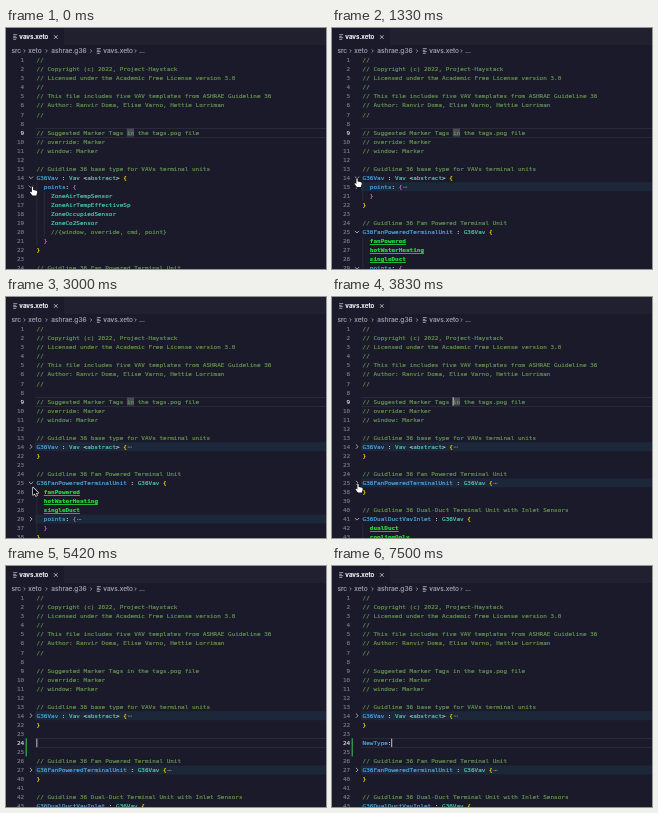
An HTML page with a canvas that plays this animation: 320 by 241 pixels, repeating every 8 s.

```html
<!DOCTYPE html>
<html lang="en">
<head>
<meta charset="utf-8">
<title>Code folding</title>
<style>
html, body { margin: 0; width: 100%; height: 100%; overflow: hidden; background: #1b1a2a; }
canvas { display: block; width: 320px; height: 241px; }
</style>
</head>
<body>
<canvas id="stage" width="320" height="241"></canvas>
<script>
const ctx = document.getElementById('stage').getContext('2d');
const LOOP = 8000, LEFT = 30.6, CHAR = 3.61, TOP = 32, PITCH = 9.05;
const MONO = '"DejaVu Sans Mono", monospace', SANS = 'Inter, sans-serif';
const C = {
  bg: '#1b1a2a', bar: '#20202f', line: '#2f2e3e', fold: '#1c2739', guide: '#353449',
  num: '#737682', numOn: '#d0d0d4', plain: '#d4d4d4', comment: '#639350', key: '#4fa6e0',
  type: '#4ec9b0', marker: '#23e03c', braces: ['#ffd700', '#c86ecb'], grey: '#a3a2b0',
  added: '#37a04c'
};

const code = `//
// Copyright (c) 2022, Project-Haystack
// Licensed under the Academic Free License version 3.0
//
// This file includes five VAV templates from ASHRAE Guideline 36
// Author: Ranvir Doma, Elise Varno, Hettie Lorriman
//

// Suggested Marker Tags in the tags.pog file
// override: Marker
// window: Marker

// Guidline 36 base type for VAVs terminal units
G36Vav : Vav <abstract> {
  points: {
    ZoneAirTempSensor
    ZoneAirTempEffectiveSp
    ZoneOccupiedSensor
    ZoneCo2Sensor
    //{window, override, cmd, point}
  }
}

// Guidline 36 Fan Powered Terminal Unit
G36FanPoweredTerminalUnit : G36Vav {
  fanPowered
  hotWaterHeating
  singleDuct
  points: {
    DischargeFanSpeedCmd
    DischargeFanRunSensor





  }
}

// Guidline 36 Dual-Duct Terminal Unit with Inlet Sensors
G36DualDuctVavInlet : G36Vav {
  dualDuct
  coolingOnly`.split('\n');

// Fold ranges: header line, last hidden line, time of the click
const folds = [
  { head: 15, end: 20, at: 250 },
  { head: 14, end: 21, at: 1500 },
  { head: 29, end: 36, at: 2500 },
  { head: 25, end: 37, at: 3670 },
  { head: 41, end: 60, at: Infinity }
];
const CLICK = 4830, ENTERS = [5100, 5330], BAR = 5420;
const typed = 'NewType:', keys = [5830, 6080, 6250, 6750, 6920, 7080, 7250, 7500];

// Pointer path: time, x, y
const path = [
  [0, 26.5, 159], [500, 26.5, 159], [1150, 25, 150.5], [1650, 25, 150.5], [1920, 25, 207.5],
  [2200, 26, 221], [2600, 26, 221], [3000, 27, 190.5], [3330, 26, 187], [4350, 26, 187],
  [4670, 44, 162], [4830, 48, 160], [LOOP, 48, 160]
];

const rowY = r => TOP + r * PITCH;
const count = (times, t) => times.filter(k => t >= k).length;

// The thin outline gives small glyphs a fuller weight
function text(s, x, y, color, size = 6, family = MONO, weight = 400, align = 'left') {
  ctx.save();
  ctx.translate(x, y);
  ctx.scale(0.1, 0.1);
  ctx.font = `${weight} ${size * 10}px ${family}`;
  ctx.textAlign = align;
  ctx.fillStyle = ctx.strokeStyle = color;
  ctx.lineWidth = 1.8;
  ctx.lineJoin = 'round';
  ctx.fillText(s, 0, 0);
  ctx.strokeText(s, 0, 0);
  ctx.restore();
}

function rect(x, y, w, h, color) {
  ctx.fillStyle = color;
  ctx.fillRect(x, y, w, h);
}

function stroke(points, color, width = 0.8) {
  ctx.strokeStyle = color;
  ctx.lineWidth = width;
  ctx.beginPath();
  points.forEach(([x, y]) => ctx.lineTo(x, y));
  ctx.stroke();
}

function chevron(x, y, s, open, color) {
  stroke(open ? [[x - s, y - s / 2], [x, y + s / 2], [x + s, y - s / 2]]
              : [[x - s / 2, y - s], [x + s / 2, y], [x - s / 2, y + s]], color);
}

function fileIcon(x, y) {
  [4, 2.6, 4, 3].forEach((w, i) => rect(x, y - 2.6 + i * 1.5, w, 0.7, '#c8c8d2'));
}

function header() {
  rect(0, 0, 320, 17, C.bar);
  rect(0, 0, 58, 17, C.bg);
  fileIcon(7.2, 9);
  text('vavs.xeto', 13.3, 11.2, '#f4f4f6', 6.2, SANS, 600);
  stroke([[48, 7.2], [51.6, 10.8]], '#d0d0d4');
  stroke([[51.6, 7.2], [48, 10.8]], '#d0d0d4');
  const crumb = (s, x) => text(s, x, 25.2, C.grey, 6.6, SANS);
  crumb('src', 5.5);
  crumb('xeto', 22.3);
  crumb('ashrae.g36', 45.3);
  crumb('vavs.xeto', 97.3);
  crumb('...', 133.2);
  [18.5, 40.5, 85, 129.5].forEach(x => chevron(x, 23, 1.6, false, C.grey));
  fileIcon(90.8, 23);
}

function visibleRows(t) {
  const shut = folds.filter(f => t >= f.at), added = count(ENTERS, t), rows = [];
  code.forEach((s, i) => {
    const n = i + 1;
    if (shut.some(f => n > f.head && n <= f.end)) return;
    const fold = folds.find(f => f.head === n);
    rows.push({ s, n: n + (n > 22 ? added : 0), fold, shut: shut.includes(fold) });
    if (n === 22) {
      for (let k = 1; k <= added; k++)
        rows.push({ s: k === 2 ? typed.slice(0, count(keys, t)) : '', n: 22 + k });
    }
  });
  return rows.slice(0, 24);
}

function drawCode(s, y) {
  const indent = s.search(/\S/), base = y + 2.2;
  for (let g = 0; g < indent; g += 2) rect(LEFT + g * CHAR, y - PITCH / 2, 0.6, PITCH, C.guide);
  for (const m of s.matchAll(/\/\/.*|\w+(?= ?:)|\w+|[^\s\w]/g)) {
    const w = m[0], x = LEFT + m.index * CHAR;
    const after = s.slice(m.index + w.length);
    const marker = /^[a-z]\w*$/.test(w) && w === s.trim();
    let color = C.plain;
    if (w.startsWith('//')) color = C.comment;
    else if (/[{}]/.test(w)) color = C.braces[indent ? 1 : 0];
    else if (marker) color = C.marker;
    else if (/^ ?:/.test(after)) color = C.key;
    else if (/^\w/.test(w)) color = C.type;
    text(w, x, base, color, 6, MONO, marker ? 700 : 400);
    if (marker) rect(x, base + 0.9, w.length * CHAR, 0.8, color);
  }
}

function pointerAt(t) {
  const i = path.findIndex((p, k) => k && t <= p[0]);
  const [t0, x0, y0] = path[i - 1], [t1, x1, y1] = path[i];
  const u = (t - t0) / (t1 - t0), e = u * u * (3 - 2 * u);
  return { x: x0 + (x1 - x0) * e, y: y0 + (y1 - y0) * e };
}

function shape(d, x, y, fill, edge) {
  ctx.save();
  ctx.translate(x, y);
  const p = new Path2D(d);
  ctx.lineJoin = 'round';
  ctx.lineWidth = 1.3;
  ctx.strokeStyle = edge;
  ctx.stroke(p);
  ctx.fillStyle = fill;
  ctx.fill(p);
  ctx.restore();
}

function drawPointer({ x, y }, rows) {
  if (x > 31) {
    stroke([[x - 1.8, y - 4], [x, y - 3.4], [x + 1.8, y - 4]], '#e8e8e8');
    stroke([[x, y - 3.4], [x, y + 3.4]], '#e8e8e8', 1);
    stroke([[x - 1.8, y + 4], [x, y + 3.4], [x + 1.8, y + 4]], '#e8e8e8');
  } else if (rows.some((r, i) => r.fold && Math.abs(rowY(i) - y) < 3.5)) {
    shape('M-.6 .2Q0-.6.6.2V3L4 3.8Q5 4.2 4.7 5.5L3.8 8.6H0L-2.4 5.6Q-2.6 4.4-1.5 4.7L-.6 5.4Z',
      x, y, '#fff', '#15151c');
  } else {
    shape('M0 0V7.4L1.7 5.9L2.9 8.5L4.1 8L3 5.4H5.3Z', x, y, '#0a0a0e', '#f0f0f0');
  }
}

function draw(t) {
  const rows = visibleRows(t), mouse = pointerAt(t), gutter = mouse.x < 31;
  const active = t < CLICK ? 9 : 22 + count(ENTERS, t);
  rect(0, 0, 320, 241, C.bg);
  header();

  rows.forEach((r, i) => {
    const y = rowY(i), top = y - PITCH / 2, on = r.n === active;
    if (r.shut) rect(29, top, 291, PITCH, C.fold);
    if (on) {
      rect(29, Math.round(top), 291, 0.8, C.line);
      rect(29, Math.round(top + PITCH), 291, 0.8, C.line);
    }
    if (on && active === 9) rect(LEFT + 25 * CHAR, top + 0.6, 2 * CHAR, PITCH - 1, '#484953');
    if (active === 22 && (r.n === 14 || r.n === 22)) {
      ctx.strokeStyle = '#85868c';
      ctx.lineWidth = 0.6;
      ctx.strokeRect(LEFT + (r.s.length - 1) * CHAR, top + 0.8, CHAR, PITCH - 1.6);
    }
    if (t >= BAR && (r.n === 24 || r.n === 25)) rect(19.6, top, 1.3, PITCH, C.added);
    text(r.n, 18.2, y + 2.2, on ? C.numOn : C.num, 6, MONO, 400, 'right');
    if (r.fold && (r.shut || gutter)) chevron(25, y, 2.1, !r.shut, '#c0c1c8');
    drawCode(r.s, y);
    if (r.shut) {
      const x = LEFT + r.s.length * CHAR + 1;
      for (let k = 0; k < 3; k++) rect(x + k * 1.5, y, 0.9, 0.9, '#9a9ca6');
    }
  });

  // Caret restarts its blink after each click or key
  const last = [CLICK, ...ENTERS, ...keys].filter(k => t >= k).pop();
  const shown = last === undefined ? Math.floor(t / 500) % 2 === 1 : Math.floor((t - last) / 500) % 2 === 0;
  if (shown) {
    const i = rows.findIndex(r => r.n === active);
    const col = active === 9 ? 25 : rows[i].s.length;
    rect(LEFT + col * CHAR - 0.2, rowY(i) - PITCH / 2 + 0.4, 0.9, PITCH - 0.6, '#d8d8dc');
  }
  if (t < ENTERS[0]) drawPointer(mouse, rows);
}

const start = performance.now();
function tick() {
  draw((performance.now() - start) % LOOP);
  requestAnimationFrame(tick);
}
tick();
</script>
</body>
</html>
```
